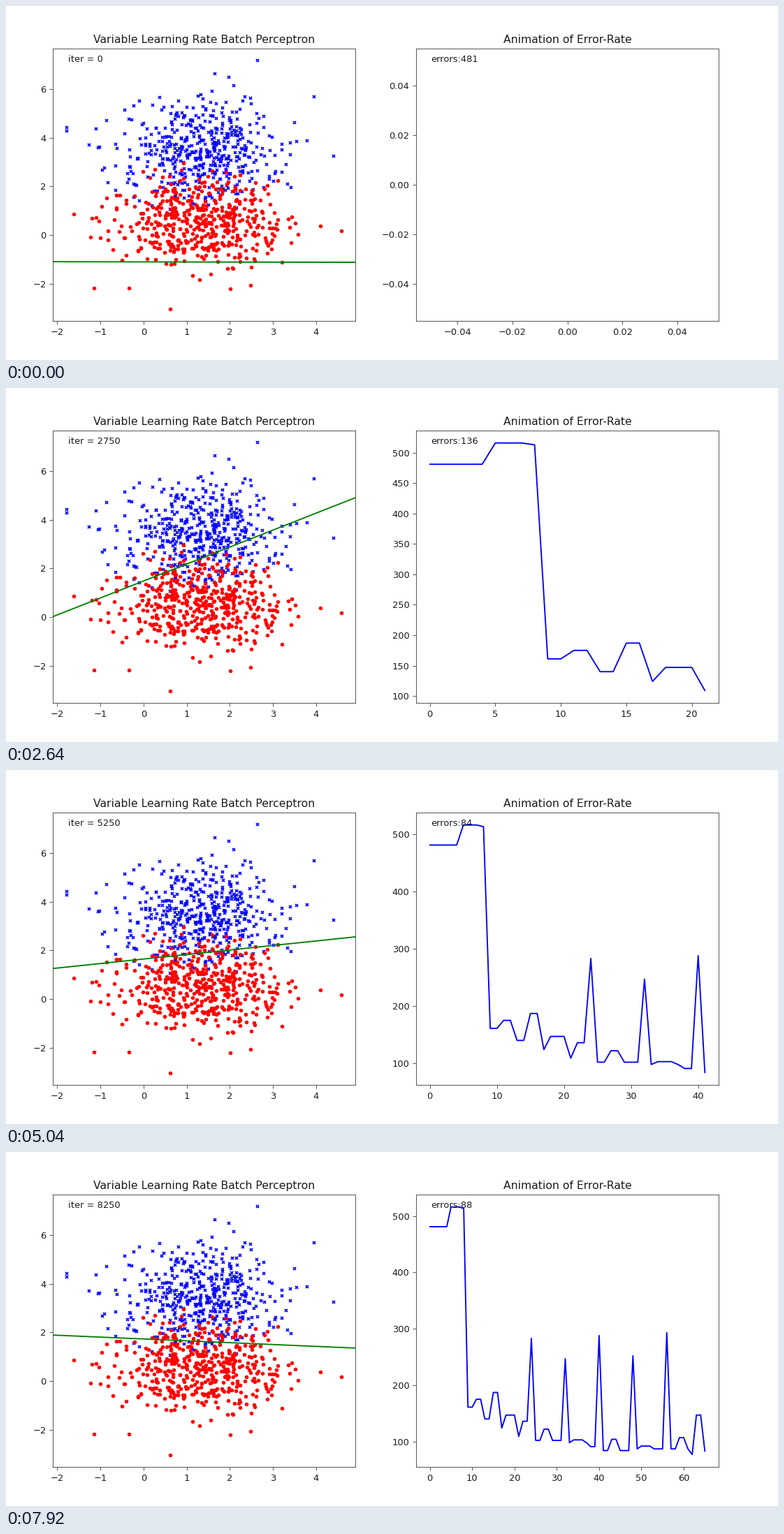
Animation, 1105 px wide and 507 px high, one loop 8000 ms. Source, as a matplotlib script:

```python
import numpy as np
import matplotlib.pyplot as plt
from matplotlib.animation import FuncAnimation

W, H, DPI = 1105, 507, 100
STEP, TICK, LOOP = 120, 40, 8000      # ms
STEPS = -(-LOOP // STEP)
INK, EDGE = "#1c1c1c", "#383838"

plt.rcParams.update({
    "font.family": "DejaVu Sans", "font.size": 9.4,
    "axes.titlesize": 11.25, "axes.linewidth": 0.6,
    "axes.edgecolor": EDGE, "text.color": INK,
    "xtick.color": EDGE, "ytick.color": EDGE,
    "xtick.labelcolor": INK, "ytick.labelcolor": INK,
    "xtick.major.width": 0.6, "ytick.major.width": 0.6,
})

# Error level from each step on, held until the next
LEVELS = {0: 481, 5: 516, 8: 513, 9: 161, 11: 175, 13: 140, 15: 187, 17: 124,
          18: 147, 21: 109, 22: 136, 25: 102, 33: 98, 38: 91, 41: 84, 49: 87,
          62: 77, 63: 147, 65: 83}


def error_count(k):
    level = LEVELS[max(s for s in LEVELS if s <= k)]
    if k < 24:
        return level
    if k % 8 == 0 and k < 64:         # regular overshoot
        return round(245 + 38 * (k % 16 > 0) + 0.3 * (k - 24))
    return level + 20 * (k % 16 in (11, 12)) + 5 * (k % 16 in (2, 3, 4))


def boundary(k):
    """Slope and intercept of the decision line at step k."""
    if k < 5:
        return -0.0035, -1.103
    if k < 9:
        return (-2.2, -1.4) if k < 8 else (-2.32, -1.573)
    keys = [9, 22, 31, 42, 56, 66]
    slope = np.interp(k, keys, [0.8, 0.615, 0.371, 0.187, 0.078, -0.081])
    icept = np.interp(k, keys, [0.6, 1.129, 1.451, 1.650, 1.652, 1.706])
    excess = errors[k] - 85           # a worse fit lifts and tilts the line
    return slope + 0.0016 * excess, icept + 0.0069 * excess


def cloud(rng, center, spread, extremes, total=500):
    """Seeded normal cloud plus its few most distant points."""
    pts = rng.normal(size=(2 * total, 2))
    pts = pts[np.hypot(*pts.T) < 2.6][:total - len(extremes)]
    return np.vstack([pts * spread + center, extremes]).T


def panel(left, title):
    ax = fig.add_axes([left / W, 1 - 451 / H, 433 / W, 390 / H])
    ax.set_title(title)
    return ax, ax.text(0.05, 0.95, "", transform=ax.transAxes)


errors = [error_count(k) for k in range(STEPS)]

fig = plt.figure(figsize=(W / DPI, H / DPI), dpi=DPI, facecolor="white")
ax1, iter_text = panel(67, "Variable Learning Rate Batch Perceptron")
ax2, err_text = panel(587, "Animation of Error-Rate")

rng = np.random.default_rng(12)
blue = cloud(rng, (1.35, 3.4), (1.03, 0.98),
             [(-1.78, 4.43), (-1.78, 4.26), (2.64, 7.17), (1.65, 6.61),
              (1.97, 6.47), (2.09, 6.15), (3.95, 5.69), (4.41, 3.23)])
red = cloud(rng, (1.33, 0.53), (1.03, 0.95),
            [(-1.62, 0.86), (-1.15, -2.18), (-0.34, -2.18), (0.62, -3.03),
             (2.01, -2.2), (2.48, -2.07), (4.58, 0.17), (4.1, 0.37)])
ax1.plot(*blue, "x", color="blue", ms=3.4, mew=1.25)
ax1.plot(*red, "o", color="red", ms=4, mew=0)
ax1.set_xlim(-2.105, 4.907)
ax1.set_ylim(-3.527, 7.656)
split, = ax1.plot([], [], color="green", lw=1.35)
curve, = ax2.plot([], [], color="blue", lw=1.35)
ends = np.array(ax1.get_xlim())


def update(i):
    k = i * TICK // STEP
    slope, icept = boundary(k)
    split.set_data(ends, slope * ends + icept)
    iter_text.set_text(f"iter = {125 * k}")
    err_text.set_text(f"errors:{errors[k]}")
    curve.set_data(range(k), errors[:k])
    if k == 0:
        ax2.set_xlim(-0.055, 0.055, auto=True)
        ax2.set_ylim(-0.055, 0.055, auto=True)
    else:
        ax2.relim()
        ax2.autoscale_view()
    return split, curve, iter_text, err_text


anim = FuncAnimation(fig, update, frames=LOOP // TICK, interval=TICK,
                     init_func=lambda: update(0), repeat=True, repeat_delay=0)
plt.show()
```
